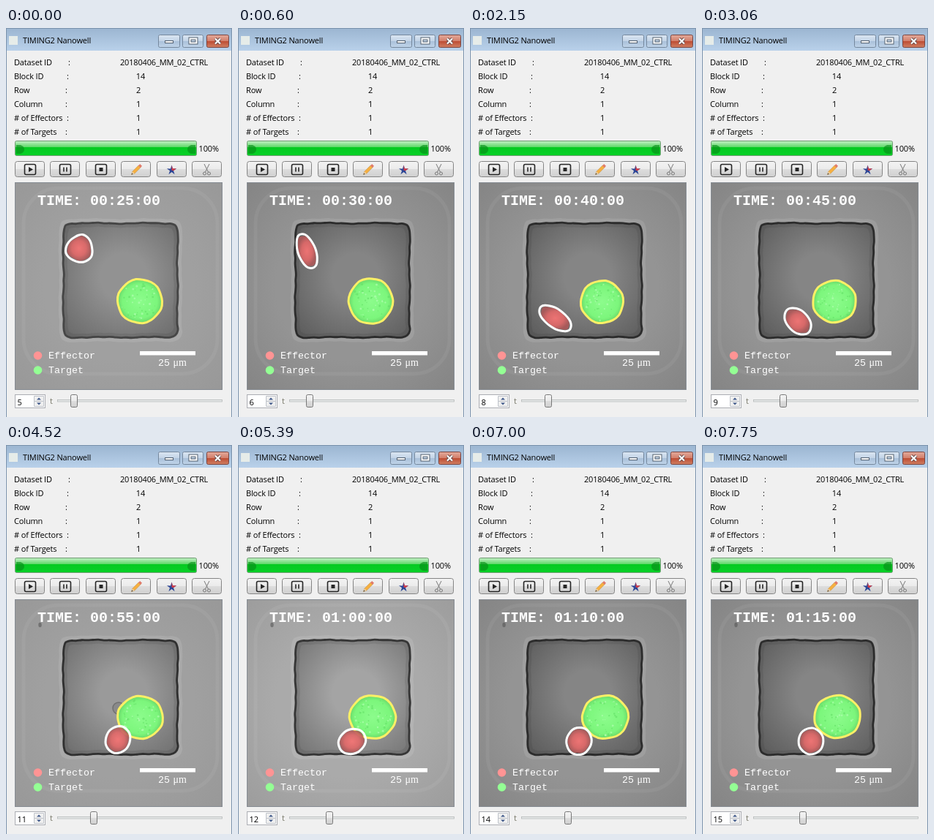
Animation, 309 px wide and 532 px high, one loop 8000 ms. Source, as an HTML page:

```html
<!DOCTYPE html>
<html lang="en">
<head>
<meta charset="utf-8">
<title>TIMING2 Nanowell</title>
<style>
html, body { margin: 0; width: 100%; height: 100%; overflow: hidden; background: #f0f0f0; }
svg { display: block; width: 100vw; height: 100vh; }
text { white-space: pre; }
.ui { font: 11px "Open Sans", "Noto Sans", sans-serif; letter-spacing: -.15px; fill: #000; }
.mono { font: 13.33px "Liberation Mono", monospace; fill: #fff; }
.mid { text-anchor: middle; }
</style>
</head>
<body>
<svg id="stage" viewBox="0 0 309 532" preserveAspectRatio="none">
  <defs>
    <linearGradient id="title" x2="0" y2="1"><stop stop-color="#9bb5d1"/><stop offset="1" stop-color="#b9d1ea"/></linearGradient>
    <linearGradient id="caption" x2="0" y2="1"><stop stop-color="#dbe6f2"/><stop offset=".48" stop-color="#c3d4e7"/><stop offset=".5" stop-color="#a9c0d9"/><stop offset="1" stop-color="#c0d4e9"/></linearGradient>
    <linearGradient id="close" x2="0" y2="1"><stop stop-color="#e3aa9b"/><stop offset=".48" stop-color="#d3806c"/><stop offset=".5" stop-color="#bd4b32"/><stop offset="1" stop-color="#d08063"/></linearGradient>
    <linearGradient id="button" x2="0" y2="1"><stop stop-color="#f3f3f3"/><stop offset=".49" stop-color="#ebebeb"/><stop offset=".5" stop-color="#dddddd"/><stop offset="1" stop-color="#d0d0d0"/></linearGradient>
    <linearGradient id="progress" x2="0" y2="1"><stop stop-color="#c4f0c6"/><stop offset=".4" stop-color="#62d96c"/><stop offset=".45" stop-color="#06ca22"/><stop offset="1" stop-color="#07d127"/></linearGradient>
    <radialGradient id="field" r=".72"><stop offset=".5" stop-color="var(--outer)"/><stop offset="1" stop-color="var(--corner)"/></radialGradient>
    <radialGradient id="floor" cx=".53" cy=".47" r=".68"><stop offset=".3" stop-color="var(--light)"/><stop offset="1" stop-color="var(--dark)"/></radialGradient>
    <radialGradient id="red"><stop stop-color="#fa7474"/><stop offset=".6" stop-color="#e26868"/><stop offset="1" stop-color="#ac5858"/></radialGradient>
    <radialGradient id="green"><stop stop-color="#8cfc8c"/><stop offset=".8" stop-color="#7cf67c"/><stop offset="1" stop-color="#6cdc6c"/></radialGradient>
    <clipPath id="view"><rect x="13" y="212" width="282" height="282"/></clipPath>
  </defs>

  <rect width="309" height="532" fill="#f0f0f0"/>
  <rect width="309" height="31" fill="url(#title)"/>
  <path d="M0 .5H309M.5 0V532M308.5 0V532" stroke="#7d94ad"/>
  <rect x="4" y="11" width="12" height="12" fill="#e6ece9"/>
  <text class="ui" x="23" y="21">TIMING2 Nanowell</text>
  <g stroke="#75889d">
    <rect x="208.5" y="9.5" width="29" height="17" rx="2" fill="url(#caption)"/>
    <rect x="241.5" y="9.5" width="28" height="17" rx="2" fill="url(#caption)"/>
    <rect x="274.5" y="9.5" width="30" height="17" rx="2" fill="url(#close)" stroke="#7b4540"/>
  </g>
  <rect x="217.5" y="17.5" width="11" height="3" fill="#fff" stroke="#53606f"/>
  <g fill="none">
    <path d="M251.5 14.5h9v6h-9z" stroke="#53606f" stroke-width="4"/><path d="M251.5 14.5h9v6h-9z" stroke="#fff" stroke-width="2"/>
    <path d="M286 14.5l7 7m0-7l-7 7" stroke="#634a4a" stroke-width="4"/><path d="M286 14.5l7 7m0-7l-7 7" stroke="#fff" stroke-width="2.2"/>
  </g>

  <g id="labels"></g>
  <rect x="12.5" y="154.5" width="248" height="20" rx="2" fill="url(#progress)" stroke="#6f9b72"/>
  <g fill="#078f18" opacity=".65"><path d="M14 160h6q5 2 5 6t-5 6h-6z"/><path d="M259 160h-6q-5 2-5 6t5 6h6z"/></g>
  <text class="ui" x="263.5" y="169">100%</text>

  <g id="buttons" fill="url(#button)" stroke="#858585"></g>
  <g fill="none" stroke="#262626" stroke-width="1.6">
    <rect x="25.5" y="186.5" width="15" height="14" rx="2"/>
    <rect x="73.5" y="186.5" width="15" height="14" rx="2"/>
    <rect x="122.5" y="186.5" width="15" height="14" rx="2"/>
    <path d="M79 190.5v6M83 190.5v6"/>
  </g>
  <path d="M31 190l6 3.5-6 3.5zM127.5 191h5v5h-5z" fill="#262626"/>
  <g transform="translate(171.5 200.5) rotate(-45)">
    <path d="M0 0l4-2h12v4H4z" fill="#f6b040" stroke="#b98a45" stroke-width=".5"/>
    <path d="M0 0l4-2v4z" fill="#ead0a8"/><path d="M0 0l2-1v2z" fill="#333"/>
    <path d="M15.5-2h3v4h-3z" fill="#e07a6a"/>
  </g>
  <path id="star" fill="#2c4696"/>
  <path d="M226.5 187.500l1.500 4.700 4.700.1-3.700 3-2.500-.8z" fill="#d43b45"/>
  <g fill="none" stroke="#777" stroke-width="1"><path d="M271 186l5.500 11M278 186l-5.500 11"/><circle cx="271.5" cy="199" r="2"/><circle cx="277.5" cy="199" r="2"/></g>

  <g clip-path="url(#view)">
    <rect x="12" y="211" width="284" height="284" fill="url(#field)"/>
    <rect x="24" y="219" width="265" height="254" rx="48" fill="none" stroke="#fff" stroke-width="5" opacity=".05"/>
    <path id="halo" fill="none" stroke="#fff" stroke-width="5" opacity=".1"/>
    <path id="well" fill="url(#floor)" stroke="var(--line)" stroke-width="2.8"/>
    <path id="rim" fill="none" stroke="#222" stroke-width="5" opacity=".1"/>
    <circle id="debris" cx="154" cy="360" r="8" fill="#8a8a8a" stroke="#707070" stroke-width="1.5"/>
    <ellipse id="dust" cx="46.5" cy="246" rx="2.2" ry="3.2" fill="#555" opacity=".6"/>
    <path id="targetFill" fill="url(#green)"/>
    <g id="grain"></g>
    <path id="targetLine" fill="none" stroke="#fdf066" stroke-width="3"/>
    <path id="effectorFill" fill="url(#red)" opacity=".9"/>
    <path id="effectorLine" fill="none" stroke="#fff" stroke-width="3"/>
  </g>
  <rect x="12.5" y="211.5" width="283" height="283" fill="none" stroke="#858b92"/>
  <text id="clock" class="mono" x="43" y="242" style="font-size:20px;font-weight:bold"></text>
  <circle cx="43.5" cy="448" r="5.8" fill="#ff9494"/><text class="mono" x="58" y="452">Effector</text>
  <circle cx="43.5" cy="468" r="5.8" fill="#94ff94"/><text class="mono" x="58" y="472">Target</text>
  <rect x="183" y="442" width="76" height="5.5" fill="#fff"/>
  <text class="mono" x="208" y="462">25</text><text x="228.5" y="462" fill="#fff" style="font:14px 'Liberation Serif',serif">μm</text>

  <rect x="12.5" y="501.5" width="41" height="18" fill="#fff" stroke="#abadb3"/>
  <text id="count" class="ui" x="15.5" y="516"></text>
  <path d="M38.5 503.5h13v7h-13zm0 7h13v7h-13z" fill="#f0f0f0" stroke="#bfc3ca"/>
  <path d="M42 508.5l3-3 3 3zM42 512.5l3 3 3-3z" fill="#40598a"/>
  <text class="ui" x="60" y="514" style="fill:#777768">t</text>
  <rect x="70.5" y="508.5" width="225" height="2.5" fill="#e7eaea" stroke="#b5b8b8" stroke-width=".8"/>
  <rect id="handle" x="-4.5" y="501.5" width="9" height="17" rx="2" fill="url(#button)" stroke="#777"/>
</svg>
<script>
const $ = id => document.getElementById(id);
const DURATION = 8000, FIRST = 5;
const starts = [0, 600, 1370, 2150, 3060, 3780, 4520, 5390, 6260, 7000, 7750];

// Center x, y, radii, tilt in degrees, narrowing toward the lower end
const effector = [
  [101, 301, 18.5, 19.5, 18, .25], [94, 305, 12.5, 25.5, -20, .05],
  [98, 354, 13, 25, -30, 0], [116.5, 397, 13, 26, -55, 0],
  [131, 401, 15, 22, -45, 0], [145, 403, 17, 19, 0, 0],
  [153, 403, 17, 19.5, 25, 0], [156, 405.5, 17, 20, 60, 0],
  [149, 405, 17.5, 21.5, 35, -.1], [149, 405, 17.5, 19.5, 18, 0],
  [149, 405, 17.5, 18.5, 0, 0]
];
// Left, top, right, bottom
const target = [
  [152, 343, 214, 404], [151, 342, 212, 405], [151, 344, 211, 404], [151, 345, 210, 404],
  [151, 345, 211, 403], [152, 344, 213, 403], [152, 343, 215, 402], [152, 342, 216, 402],
  [153, 341, 217, 402], [153, 342, 217, 402], [153, 342, 217, 401]
];
// Grey levels: outer, corner, dark, light, line
const tones = {
  soft: [148, 132, 94, 133, 44], flat: [160, 152, 108, 146, 70],
  mid: [160, 152, 112, 154, 48], pale: [170, 156, 118, 164, 54]
};
const looks = ["flat", "soft", "soft", "soft", "soft", "soft", "mid", "pale", "soft", "soft", "soft"];
const toneNames = ["outer", "corner", "dark", "light", "line"];

const fix = v => v.toFixed(2);

// Closed Catmull-Rom curve
function smooth(points) {
  const at = i => points[(i + points.length) % points.length];
  return points.reduce((d, p, i) => {
    const a = at(i - 1), q = at(i + 1), b = at(i + 2);
    const ctrl = [0, 1].map(k => p[k] + (q[k] - a[k]) / 6).concat([0, 1].map(k => q[k] - (b[k] - p[k]) / 6));
    return d + "C" + [...ctrl, ...q].map(fix).join(" ");
  }, "M" + points[0].map(fix).join(" ")) + "Z";
}

function egg([cx, cy, rx, ry, tilt, taper], scale = 1, wobble = 0, seed = 0) {
  const r = tilt * Math.PI / 180, c = Math.cos(r), s = Math.sin(r);
  return smooth(Array.from({ length: 18 }, (_, i) => {
    const t = i * Math.PI / 9;
    const k = scale * (1 + wobble * Math.sin(i * 2.1 + seed));
    const x = rx * k * Math.cos(t) * (1 + taper * Math.sin(t)), y = ry * k * Math.sin(t);
    return [cx + x * c - y * s, cy + x * s + y * c];
  }));
}

// Slightly uneven square with rounded corners
function wellPath(half) {
  const points = [], steps = 19, radius = 10;
  const turn = (x, y, c, s) => points.push([156.5 + x * c - y * s, 345 + x * s + y * c]);
  for (let side = 0; side < 4; side++) {
    const a = side * Math.PI / 2, c = Math.round(Math.cos(a)), s = Math.round(Math.sin(a));
    for (let i = 0; i < steps; i++) {
      const x = (i / (steps - 1) * 2 - 1) * (half - radius);
      turn(x, -half + .35 * Math.sin(i * 2.3 + side) + .6 * Math.cos(i * .7 + side * 2), c, s);
    }
    turn(half - radius * .3, -half + radius * .3, c, s);
  }
  return smooth(points);
}

function random(seed) {
  return () => (seed = seed * 16807 % 2147483647) / 2147483647;
}

function grain(cx, cy, seed) {
  const next = random(seed * 7919 + 11);
  return Array.from({ length: 50 }, (_, i) => {
    const a = next() * 2 * Math.PI, r = 26 * Math.sqrt(next());
    return `<circle cx="${fix(cx + r * Math.cos(a))}" cy="${fix(cy + r * Math.sin(a))}" r="${fix(.6 + next())}" fill="${i % 2 ? "#b8ffb8" : "#62dd66"}" opacity=".6"/>`;
  }).join("");
}

const rows = [
  ["Dataset ID", 85, "20180406_MM_02_CTRL", 216], ["Block ID", 83, "14", 184],
  ["Row", 81, "2", 181], ["Column", 81, "1", 181],
  ["# of Effectors", 83, "1", 181], ["# of Targets", 81, "1", 181]
];
$("labels").innerHTML = rows.map(([name, colon, value, x], i) => {
  const y = 51 + i * 19;
  return `<g class="ui"><text x="11" y="${y}">${name}</text><text x="${colon}" y="${y}">:</text><text class="mid" x="${x}" y="${y}">${value}</text></g>`;
}).join("");
$("buttons").innerHTML = Array.from({ length: 6 }, (_, i) =>
  `<rect x="${Math.round(13 + i * 48.4) - .5}" y="182.5" width="40" height="21" rx="3"/>`).join("");
$("star").setAttribute("d", "M" + Array.from({ length: 10 }, (_, i) => {
  const a = i * Math.PI / 5, r = i % 2 ? 2.6 : 7;
  return [226.5 + r * Math.sin(a), 194.5 - r * Math.cos(a)].map(fix).join(" ");
}).join("L") + "Z");
$("well").setAttribute("d", wellPath(78));
$("halo").setAttribute("d", wellPath(81.5));
$("rim").setAttribute("d", wellPath(75));

function show(i) {
  const n = FIRST + i, minutes = n * 5, pad = v => String(v).padStart(2, "0");
  $("clock").textContent = `TIME: ${pad(Math.floor(minutes / 60))}:${pad(minutes % 60)}:00`;
  $("count").textContent = n;
  $("handle").setAttribute("transform", `translate(${93 + Math.round(i * 4.5)} 0)`);

  tones[looks[i]].forEach((v, k) => $("stage").style.setProperty("--" + toneNames[k], `rgb(${v},${v},${v})`));
  $("debris").style.display = n === 11 ? "" : "none";
  $("dust").style.display = n >= 11 ? "" : "none";

  const [l, t, r, b] = target[i];
  const round = [(l + r) / 2, (t + b) / 2, (r - l) / 2 - .5, (b - t) / 2 - .5, 0, 0];
  $("targetFill").setAttribute("d", egg(round, .97, .012, i));
  $("targetLine").setAttribute("d", egg(round, 1, .018, i));
  $("grain").innerHTML = grain(round[0], round[1], n);
  $("effectorFill").setAttribute("d", egg(effector[i], .86, .03, i));
  $("effectorLine").setAttribute("d", egg(effector[i], .97, .01, i));
}

let shown = -1;
function tick() {
  const time = performance.now() % DURATION;
  const i = starts.filter(s => s <= time).length - 1;
  if (i !== shown) show(shown = i);
  requestAnimationFrame(tick);
}
tick();
</script>
</body>
</html>
```
